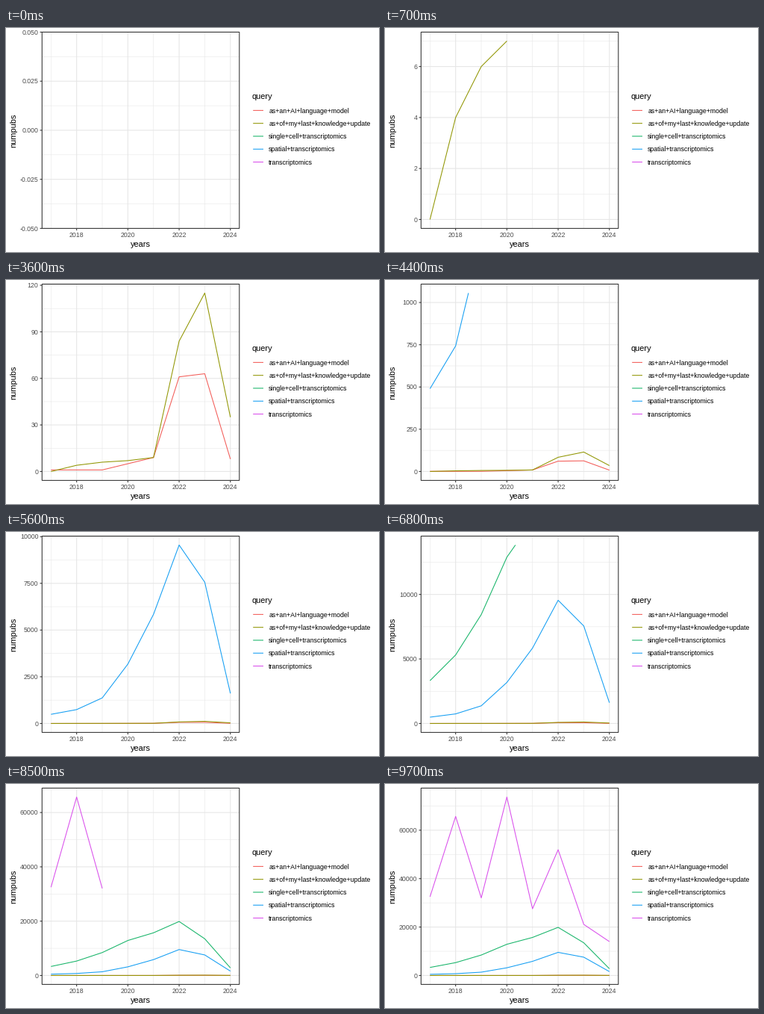
Animation of 500x300 px, one loop 10 s. Source, as a matplotlib script:

```python
import math

import matplotlib.pyplot as plt
import numpy as np
from matplotlib.animation import FuncAnimation
from matplotlib.patches import Rectangle

W, H, DPI = 500, 300, 100
FRAMES, INTERVAL = 100, 100
PT = 72 / DPI  # points per pixel

LEFT, RIGHT, TOP, BOTTOM = 48.3, 312.8, 5.5, 268.4
LINE = 1.07
TEXT, TITLE = 8.8, 11
DARK, GREY, GRID = "#333333", "#4D4D4D", "#E6E6E6"

YEARS = np.arange(2017, 2025)
X_PAD = 0.05 * (YEARS[-1] - YEARS[0])

# Legend order, which is also the drawing order.
COLORS = {
    "as+an+AI+language+model": "#F35E5A",
    "as+of+my+last+knowledge+update": "#929705",
    "single+cell+transcriptomics": "#18B56A",
    "spatial+transcriptomics": "#169FF3",
    "transcriptomics": "#DA51EC",
}

# Order in which the series are revealed.
SERIES = {
    "as+of+my+last+knowledge+update": [0, 4, 6, 7, 9, 84, 115, 35],
    "as+an+AI+language+model": [1, 1, 1, 5, 9, 61, 63, 8],
    "spatial+transcriptomics": [490, 743, 1369, 3180, 5840, 9550, 7560, 1610],
    "single+cell+transcriptomics":
        [3320, 5310, 8440, 12890, 15710, 19880, 13510, 2800],
    "transcriptomics":
        [32500, 65700, 32050, 73700, 27550, 51950, 21100, 14000],
}
SERIES_STEP, YEAR_STEP = 20.2, 2.263  # in frames

plt.rcParams["font.family"] = "Liberation Sans"
fig = plt.figure(figsize=(W / DPI, H / DPI), dpi=DPI, facecolor="white")
ax = fig.add_axes([0, 0, 1, 1])
ax.set_xlim(0, W)
ax.set_ylim(H, 0)
ax.axis("off")


def line(xs, ys, color, width=LINE, z=1):
    return ax.plot(xs, ys, color=color, lw=width * PT, zorder=z, snap=False,
                   solid_capstyle="butt")[0]


def text(x, y, s, size=TEXT, color="black", **kw):
    kw.setdefault("va", "baseline")
    return ax.text(x, y, s, fontsize=size * PT, color=color, **kw)


def x_pos(year):
    lo, hi = YEARS[0] - X_PAD, YEARS[-1] + X_PAD
    return LEFT + (year - lo) / (hi - lo) * (RIGHT - LEFT)


def nice_breaks(lo, hi, target=5):
    """Extended Wilkinson labelling: the best scored set of tick values."""
    nice = [1, 5, 2, 2.5, 4, 3]
    span = hi - lo
    best, result = -math.inf, []
    for i, q in enumerate(nice):
        for count in range(2, 12):
            power = math.ceil(math.log10(span / (count + 1) / q))
            for z in (power, power + 1):
                step = q * 10.0 ** z
                first = math.floor(hi / step) - (count - 1)
                for start in range(first, math.ceil(lo / step) + 1):
                    a, b = start * step, (start + count - 1) * step
                    simple = (a <= 0 <= b) - i / (len(nice) - 1)
                    cover = 1 - 0.5 * ((hi - b) ** 2 + (lo - a) ** 2) / (0.1 * span) ** 2
                    r = (count - 1) / (b - a)
                    rt = (target - 1) / (max(b, hi) - min(a, lo))
                    density = 2 - max(r / rt, rt / r)
                    score = 0.25 * simple + 0.2 * cover + 0.5 * density + 0.05
                    if score > best + 1e-9:
                        best = score
                        result = [(start + n) * step for n in range(count)]
    return result


def tick_labels(values):
    for digits in range(5):
        if all(abs(v - round(v, digits)) < 1e-9 for v in values):
            break
    return [f"{v + 0.0:.{digits}f}" for v in values]


def revealed(frame):
    """Visible part of every series that has started."""
    parts = {}
    for k, (name, values) in enumerate(SERIES.items()):
        times = np.array([round(SERIES_STEP * k + YEAR_STEP * j)
                          for j in range(len(YEARS))])
        if frame < times[0]:
            break
        done = times <= frame
        xs, ys = list(YEARS[done]), list(np.array(values)[done])
        if frame < times[-1]:
            xs.append(np.interp(frame, times, YEARS))
            ys.append(np.interp(frame, times, values))
        parts[name] = (np.array(xs), np.array(ys))
    return parts


def draw_static():
    for year in YEARS:
        x = x_pos(year)
        major = year % 2 == 0
        line([x, x], [TOP, BOTTOM], GRID, LINE if major else LINE / 2)
        if major:
            line([x, x], [BOTTOM, BOTTOM + 2.75], DARK)
            text(x, 279.8, str(year), color=GREY, ha="center")
    ax.add_patch(Rectangle((LEFT, TOP), RIGHT - LEFT, BOTTOM - TOP, fill=False,
                           ec=DARK, lw=LINE * PT, zorder=5, snap=False))
    text((LEFT + RIGHT) / 2, 292.7, "years", TITLE, ha="center")
    text(13.6, (TOP + BOTTOM) / 2, "numpubs", TITLE, rotation=90,
         ha="right", va="center", rotation_mode="default").set(
             ha="center", va="baseline", rotation_mode="anchor")
    text(329.5, 94.8, "query", TITLE)
    for i, (name, color) in enumerate(COLORS.items()):
        y = 110.4 + 17.28 * i
        line([331.2, 345], [y, y], color)
        text(352.3, y + 3.2, name)


moving = []


def update(frame):
    while moving:
        moving.pop().remove()

    parts = revealed(frame)
    top = max(ys.max() for _, ys in parts.values())
    if top > 0:
        lo, hi = -0.05 * top, 1.05 * top
        breaks = nice_breaks(0, top)
    else:
        lo, hi = -0.05, 0.05
        breaks = nice_breaks(lo, hi)

    def y_pos(v):
        return BOTTOM - (v - lo) / (hi - lo) * (BOTTOM - TOP)

    def inside(v):
        return lo - 1e-9 <= v <= hi + 1e-9

    half = (breaks[1] - breaks[0]) / 2
    for v in [breaks[0] - half] + [b + half for b in breaks]:
        if inside(v):
            moving.append(line([LEFT, RIGHT], [y_pos(v)] * 2, GRID, LINE / 2))

    shown = [b for b in breaks if inside(b)]
    for v, label in zip(shown, tick_labels(shown)):
        y = y_pos(v)
        moving.append(line([LEFT, RIGHT], [y, y], GRID))
        moving.append(line([LEFT - 2.75, LEFT], [y, y], DARK))
        moving.append(text(43.4, y + 3.15, label, color=GREY, ha="right"))

    for z, (name, color) in enumerate(COLORS.items()):
        if name in parts:
            xs, ys = parts[name]
            moving.append(line(x_pos(xs), y_pos(ys), color, z=3 + z / 10))
    return moving


draw_static()
anim = FuncAnimation(fig, update, frames=FRAMES, interval=INTERVAL,
                     init_func=lambda: [], repeat=True, repeat_delay=0)
plt.show()
```
